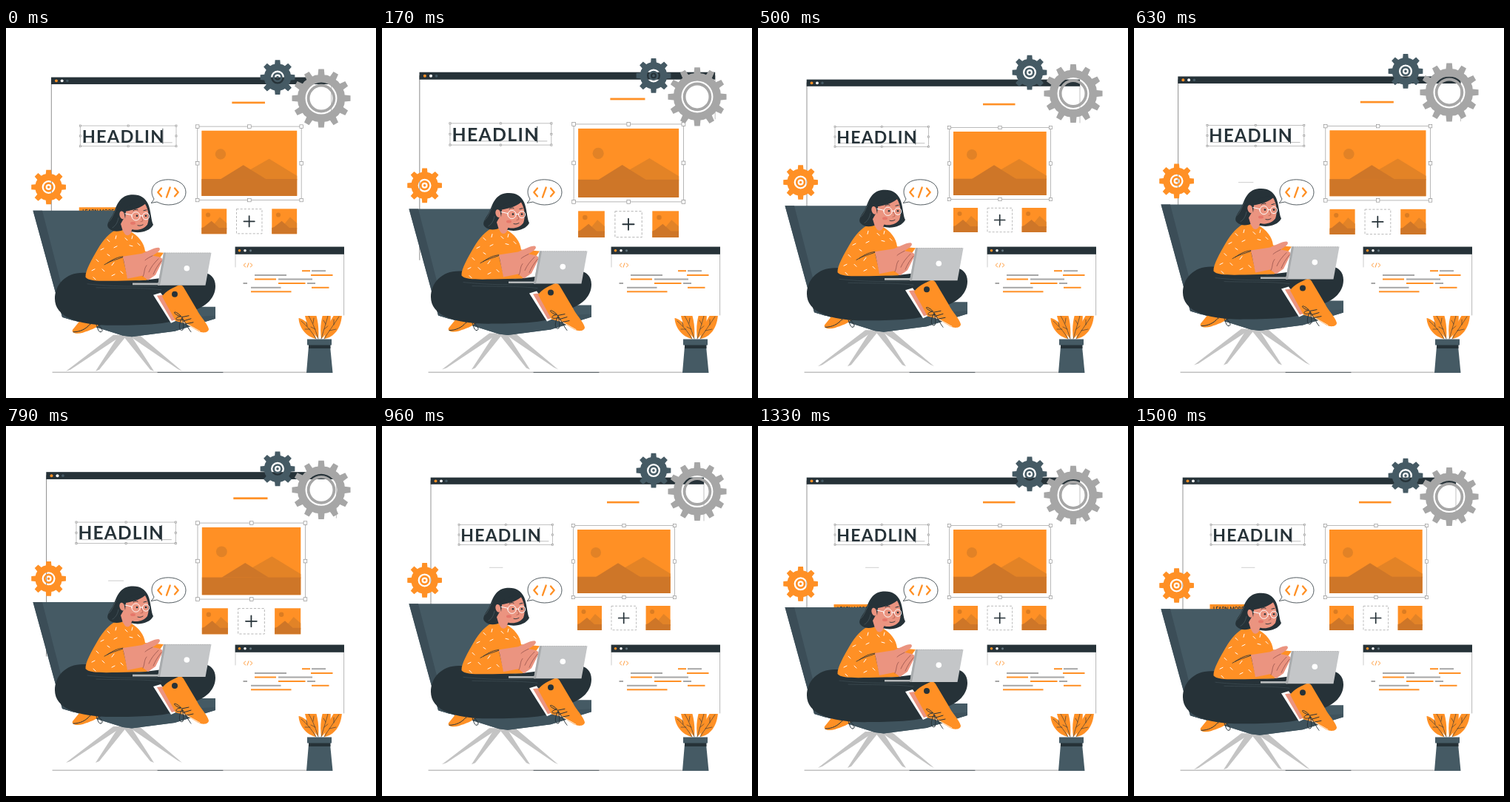
These frames come from a looping animation (500x500 px, 1.54 s). An HTML page:

```html
<!DOCTYPE html>
<html lang="en">
<head>
<meta charset="utf-8">
<title>Web design</title>
<style>
html, body { margin: 0; width: 100%; height: 100%; overflow: hidden; background: #fff; }
svg { display: block; width: 100vw; height: 100vh; }
text { font-family: Lato, sans-serif; font-weight: 700; }
</style>
</head>
<body>
<svg id="stage" viewBox="0 0 500 500"></svg>
<script>
const LOOP = 1540;
const ORANGE = '#ff9025', DARK = '#263238', SLATE = '#455a64', GREY = '#a6a6a6', SKIN = '#eb9480';

const rect = (x, y, x2, y2, fill, extra = '') =>
  `<rect x="${x}" y="${y}" width="${x2 - x}" height="${y2 - y}" fill="${fill}" ${extra}/>`;
const dot = (x, y, r, fill, extra = '') => `<circle cx="${x}" cy="${y}" r="${r}" fill="${fill}" ${extra}/>`;
const path = (d, fill, extra = '') => `<path d="${d}" fill="${fill}" ${extra}/>`;
const line = (d, color, w = 1, extra = '') =>
  path(d, 'none', `stroke="${color}" stroke-width="${w}" stroke-linecap="round" stroke-linejoin="round" ${extra}`);
const group = (id, body) => `<g id="${id}">${body}</g>`;

function ring(x, y, r) {
  return `M${x - r} ${y}a${r} ${r} 0 1 0 ${2 * r} 0a${r} ${r} 0 1 0 ${-2 * r} 0Z`;
}

function gear(x, y, teeth, outer, root, holes, fill) {
  const step = 2 * Math.PI / teeth, pts = [];
  const add = (r, a) => pts.push((x + r * Math.sin(a)).toFixed(2) + ' ' + (y - r * Math.cos(a)).toFixed(2));
  for (let i = 0; i < teeth; i++) {
    const a = i * step;
    add(root, a - step * 0.27);
    add(outer, a - step * 0.18);
    add(outer, a + step * 0.18);
    add(root, a + step * 0.27);
    add(root * 1.01, a + step * 0.5);
  }
  const d = 'M' + pts.join('L') + 'Z' + holes.map(r => ring(x, y, r)).join('');
  return path(d, fill, 'fill-rule="evenodd"');
}

function handles(x, y, x2, y2, size, fill) {
  const mx = (x + x2) / 2, my = (y + y2) / 2, h = size / 2;
  return [[x, y], [mx, y], [x2, y], [x, my], [x2, my], [x, y2], [mx, y2], [x2, y2]]
    .map(([a, b]) => rect(a - h, b - h, a + h, b + h, fill, 'stroke="#888" stroke-width=".6"')).join('');
}

function thumb(x) {
  return rect(x, 243, x + 33, 276, ORANGE) + dot(x + 8.5, 251, 3, '#db7c22') +
    path(`M${x + 14} 266l10-12 9 8v8h-19Z`, '#e28327') +
    path(`M${x} 268l3-1 10-8 10 9h10v8h-33Z`, '#ce7628');
}

function page() {
  let s = line('M66 74V304', '#666', 0.7) + line('M435 74V128', '#999', 0.6);
  s += rect(65.7, 69.6, 435, 78.8, DARK);
  s += dot(72.5, 74.3, 1.9, ORANGE) + dot(80, 74.3, 1.9, '#fff') + dot(87, 74.3, 1.7, SLATE);
  s += rect(304, 101.8, 347.5, 104.4, ORANGE);

  s += rect(104, 133.5, 230.5, 160.5, 'none', 'stroke="#aaa" stroke-width=".7"');
  s += handles(104, 133.5, 230.5, 160.5, 2, '#fff');
  s += line('M108 155.7H225', '#999', 0.6);
  s += `<text x="106.3" y="155.6" font-size="23" letter-spacing="1.2" fill="${DARK}">HEADLIN</text>`;
  s += line('M212.8 137.5V157', DARK, 0.8);

  s += line('M145.5 191.3H163', '#bbb', 0.7, 'id="rowA"') + line('M145 208H164', '#bbb', 0.7, 'id="rowB"');
  s += rect(102.5, 241, 170, 258, ORANGE);
  s += `<text x="107" y="249.8" font-size="6.5" fill="${DARK}">LEARN MORE</text>`;

  s += rect(258.5, 134.5, 395.5, 231.5, 'none', 'stroke="#aaa" stroke-width=".8"');
  s += rect(264, 140, 389.7, 226, ORANGE) + dot(289, 171, 7, '#e28226');
  s += path('M327 192L353 177L389.7 199.5V205H327Z', '#e38326');
  s += path('M289 204L319 185.3L349 204Z', '#ce7628') + rect(264, 203.7, 389.7, 226, '#ce7628');
  s += handles(258.5, 134.5, 395.5, 231.5, 4.4, '#fff');

  s += thumb(264) + thumb(356.6);
  s += rect(310, 243.3, 343.6, 275.7, 'none', 'stroke="#aaa" stroke-width=".8" stroke-dasharray="3 2"');
  s += line('M326.7 252.5V266.5M319.7 259.5H333.7', DARK, 1.7);
  return s;
}

function codeBox() {
  let s = line('M310 306V323', '#aaa', 0.6) + line('M456.6 306V388', '#999', 0.7);
  s += rect(309.6, 295.6, 457, 305.8, DARK);
  s += dot(315.5, 300.8, 1.8, ORANGE) + dot(323, 300.8, 1.8, '#fff') + dot(330.5, 300.8, 1.6, '#61727b');
  s += line('M323.7 318L321 320.5L323.7 323M330.3 318L333 320.5L330.3 323M328 317.8L326 323.2', ORANGE, 0.9);
  const rows = [
    [328.2, 400, 411, 1], [328.2, 413, 432, 0], [334, 336, 379, 0], [334, 412, 441.5, 1],
    [339.5, 336, 365, 1], [339.5, 368, 414, 0], [345, 320.5, 326, 0], [345, 368, 404.5, 1],
    [345, 407, 418, 0], [350.8, 331, 371.5, 0], [350.8, 413, 436.5, 1], [356.3, 331, 385.5, 1]
  ];
  for (const [y, x, x2, hot] of rows) s += rect(x, y - 1, x2, y + 1, hot ? ORANGE : GREY);
  return s;
}

function plant() {
  const leaf = (d, vein) => path(d, ORANGE) + line(vein, DARK, 0.6);
  let s = '<clipPath id="cut"><rect x="390" y="389" width="70" height="34"/></clipPath><g clip-path="url(#cut)">';
  s += leaf('M419 420C407 418 396 406 395.5 392C404 393 415 405 419 420Z',
    'M419 420C413 410 407 403 399 396M411 407L404 407M407 403L406 397');
  s += leaf('M422 420C410 406 404 396 403.5 384L418 384C422 396 423 408 422 420Z',
    'M422 420C417 404 413 396 409 389M418 407L412 404M415 399L416 392');
  s += leaf('M426 420C424 405 426 394 429 384L438 384C441 398 435 412 426 420Z',
    'M426 420C430 406 433 397 435 389M430 407L436 402M432 400L429 395');
  s += leaf('M430 420C432 407 438 396 445 385L454 385C454 404 444 418 430 420Z',
    'M430 420C436 410 443 401 450 390M437 409L446 407M443 401L443 394');
  s += '</g>';
  s += path('M409 430H438L441.5 466H406Z', SLATE) + rect(409, 428, 438.5, 433, DARK);
  s += rect(407, 420.5, 440, 428.5, SLATE);
  return s;
}

function chair() {
  const leg = d => path(d, '#c4c4c4');
  let s = leg('M145 415H158L87 462L81 464Z') + leg('M152 416H163L126 462L121 464Z');
  s += leg('M158 416H169L200 464L195 462Z') + leg('M166 416L179 414L238 464L232 461Z');
  s += path('M36.5 247H150L190 340L230 377H283V393L228 410L170 417.5L158 416L104 399L76 391Z', SLATE);
  s += path('M36.5 247H49L83 379L92 396L76 391Z', '#3b4d57');
  s += path('M76 391L120 398L283 389V393L228 410L170 417.5L158 416L104 399Z', '#3f535d');
  return s;
}

function legs() {
  // far shoe
  let s = path('M103 392L128 398C124 406 112 409 104 412C96 414 88 413 90 408Z', ORANGE);
  s += line('M91 411C100 411 108 407 113 401M114 401C110 397 118 392 121 399C130 396 132 401 125 402M121 399C128 403 133 410 128 411C124 411 124 404 121 399', DARK, 1);
  // trousers
  s += path('M108 331C82 329 66 346 66 366C66 391 98 403 150 402C190 402 219 400 232 394L250 383C272 377 283 364 283 349C283 338 276 331 266 331L180 342Z', DARK);
  s += line('M110 346C130 348 150 350 204 349M122 351C160 352 186 351 210 354', '#43525a', 0.6);
  // ankle and near shoe
  s += path('M199 361L209 358L234 394L223 399Z', '#fff') + path('M204 362L212 361L231 394L224 396Z', SKIN);
  s += path('M211 363C216 355 227 351 234 347.5C238 347 240 350 242 354L258 381C263 391 272 399 274 407C274 412 266 413 260 410L243 400L229 396Z', ORANGE);
  s += dot(228, 360, 4, DARK);
  s += line('M262 410C255 406 248 402 238 397', '#fff', 0.9);
  s += line('M247 389L237 391M250 393L240 396M253 398L243 400M237 390C226 379 223 386 236 390C227 391 228 397 238 394M238 392C232 402 234 411 239 408C241 403 239 397 238 392M239 393C244 402 249 410 250 411', DARK, 1);
  return s;
}

function torso() {
  let s = path('M151 272C140 276 131 287 124 299C116 313 107 328 107.5 337C112 343 130 342 150 342L190 341L200 322L213 304L188 302C187 291 179 281 168 275Z', ORANGE);
  s += line('M137 286L140 289M149 281L148 285M161 284L164 287M171 281L170 285M178 291L181 294M128 300L132 298M146 297L150 295M167 294L171 295M122 313L125 316M137 306L140 308M116 328L120 326M130 326L133 329M143 321L146 317M143 335L147 333M118 337L121 340M155 329L158 332', '#fff', 1);
  s += line('M137 318C145 312 151 310 158 309M158 310C150 313 140 315 133 320M159 313L165 338', DARK, 0.8);
  s += path('M154 266L158 273C160 281 165 283 169 277L173 270L164 258Z', SKIN);
  s += path('M158 309L184 305C191 302 200 297 206 297C210 298 207 302 204 304L198 308C207 309 212 311 212 314L202 334L192 341L184 335L164 339Z', SKIN);
  s += line('M198 308C194 310 190 312 188 314M206 312C200 318 196 323 193 330M210 315C205 321 202 326 199 333M185 336C188 330 186 326 190 321', '#8c4b45', 0.7);
  return s;
}

function head() {
  let s = path('M169 225.5C151 227 149 244 144 253C138 262 135 267 139 271C144 276 153 276 161 272C172 279 193 278 199 266C196 261 196 247 192 238C188 229 180 224.5 169 225.5Z', DARK);
  s += path('M160 247C171 247 181 242 188 238C193 246 194 258 191 266C186 273 175 275 167 271C161 268 158 261 160 247Z', SKIN);
  s += path('M155 265L160 256L171 271L168 278L158 275Z', SKIN);
  s += `<ellipse cx="157" cy="253" rx="3.5" ry="5.5" fill="${SKIN}" transform="rotate(-15 157 253)"/>`;
  s += path('M159 247C162 240 178 234 189 236C185 243 172 246 162 248L161 258Z', DARK);
  s += line('M139 262C143 259 146 250 149 244M144 270C149 267 151 262 152 257', '#52636b', 0.6);
  s += path('M168 264a3.5 2 0 1 0 7 0a3.5 2 0 1 0-7 0Z', '#e5776a');
  s += dot(177, 254, 1.3, DARK) + dot(189, 254, 1.3, DARK);
  s += line('M172 247C174 245 176 245 178 246M186 247L190 246', DARK, 1);
  s += line('M183 255L185 261L182 262', '#a75549', 0.7) + line('M178 267C181 268 183 267 185 266', DARK, 0.9);
  s += line(ring(175.5, 254.5, 5.6) + ring(189, 254.5, 4.6) + 'M161 251L170 253M181 254H184.5', '#fff', 1);
  return s;
}

function laptop() {
  let s = path('M171 344.8H210V347.4H171Z', '#b5b8b9');
  s += path('M213 304H277.5L269.5 348H205Z', '#c4c6c8') + path('M213 304H216L208 348H205Z', '#a8abad');
  s += line('M214 304.2H277', '#aaa', 0.6, 'stroke-dasharray="1.5 1.5"');
  return s + dot(244.3, 325, 3.8, '#fff');
}

function bubble() {
  let s = path('M200 231C193 220 198 205 219.5 204.8C234 205 243 212 243 222C243 232 234 239 219.5 239C213 239 208 237 204 235L196 236.5C198 235 199 233 200 231Z', '#fff', `stroke="${DARK}" stroke-width=".8"`);
  return s + line('M210 216.5L205.3 222L210 227.5M228 216.5L232.7 222L228 227.5M221.7 215.5L217 228.7', ORANGE, 2.3);
}

const stage = document.getElementById('stage');
stage.innerHTML =
  line('M63 465.2H437', '#666', 0.6) + line('M205 465.4H293', DARK, 0.7) +
  group('page', page()) +
  group('gears',
    gear(426, 95.3, 12, 39.7, 32, [21.5, 19.3, 15.5], GREY) +
    gear(367, 66.8, 8, 23.6, 18.2, [9, 6.7, 4, 1.8], SLATE) +
    gear(57.6, 215.2, 8, 23.6, 18.2, [9, 6.7, 4, 1.8], ORANGE)) +
  codeBox() + plant() +
  group('girl', chair() + legs() + torso() + head() + laptop()) +
  bubble();

const [pageEl, gearsEl, girlEl, rowA, rowB] =
  ['page', 'gears', 'girl', 'rowA', 'rowB'].map(id => document.getElementById(id));

// Two beats, then rest
function beat(p) {
  const keys = [[0, 1], [0.1, 1.1], [0.3, 1], [0.4, 1], [0.5, 1.1], [0.6, 1], [1, 1]];
  const i = keys.findIndex(k => k[0] > p);
  const [a, va] = keys[i - 1], [b, vb] = keys[i];
  return va + (vb - va) * (p - a) / (b - a);
}

// Steady rise and fall
const lift = p => 10 * (1 - Math.abs(1 - 2 * p));

function draw(t) {
  const p = ((t + 38) / LOOP) % 1;
  pageEl.setAttribute('transform', `translate(250.5 190) scale(${beat(p)}) translate(-250.5 -190)`);
  const shift = `translate(0 ${(0.3 - lift(p)).toFixed(3)})`;
  gearsEl.setAttribute('transform', shift);
  girlEl.setAttribute('transform', shift);
  rowA.setAttribute('visibility', p >= 0.6 ? 'visible' : 'hidden');
  rowB.setAttribute('visibility', p >= 0.4 && p < 0.6 ? 'visible' : 'hidden');
}

const start = performance.now();
function tick() {
  draw((performance.now() - start) % LOOP);
  requestAnimationFrame(tick);
}
draw(0);
requestAnimationFrame(tick);
</script>
</body>
</html>
```
